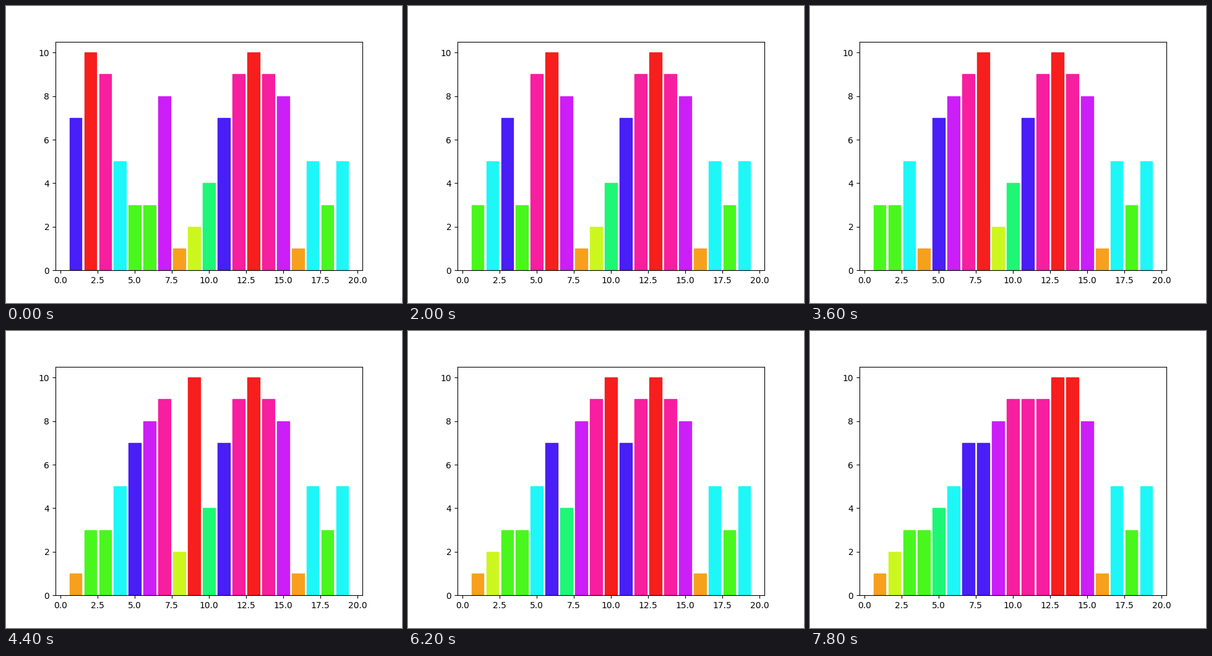
These frames come from a looping animation (640 px wide and 480 px high, 8000 ms). A matplotlib script:

```python
import colorsys
from itertools import islice

import matplotlib.pyplot as plt
from matplotlib.animation import FuncAnimation

FRAMES = 40
INTERVAL = 200
VALUES = [7, 10, 9, 5, 3, 3, 8, 1, 2, 4, 7, 9, 10, 9, 8, 1, 5, 3, 5]
TOP = max(VALUES)


def insertion_sort(values):
    """Yield the list at the start and after every swap of neighbours."""
    items = list(values)
    yield items[:]
    for i in range(1, len(items)):
        j = i
        while j > 0 and items[j] < items[j - 1]:
            items[j - 1], items[j] = items[j], items[j - 1]
            yield items[:]
            j -= 1


def bar_color(value):
    return colorsys.hsv_to_rgb(value / TOP, 0.88, 0.97)


states = list(islice(insertion_sort(VALUES), FRAMES))

fig, ax = plt.subplots(figsize=(6.4, 4.8), dpi=100)
bars = ax.bar(range(1, len(VALUES) + 1), VALUES)


def update(frame):
    for bar, value in zip(bars, states[frame]):
        bar.set_height(value)
        bar.set_color(bar_color(value))
    return bars


anim = FuncAnimation(fig, update, frames=FRAMES, interval=INTERVAL,
                     init_func=lambda: update(0), repeat=True, repeat_delay=0)
plt.show()
```
